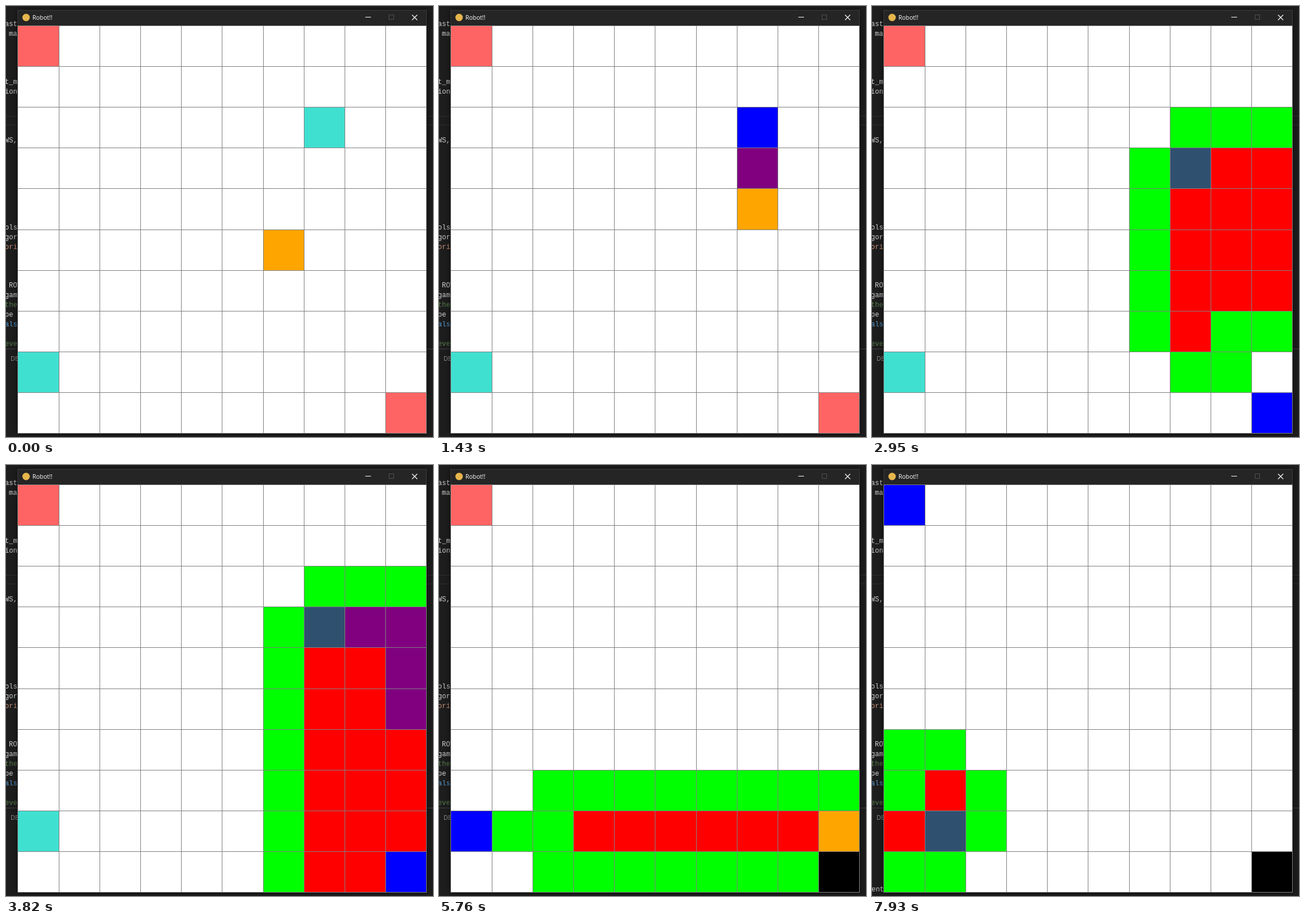
An HTML page with a canvas for the animation above (8000 ms loop, 744 px wide and 752 px high).

```html
<!DOCTYPE html>
<html lang="en">
<head>
<meta charset="utf-8">
<title>Robot grid</title>
<style>
  html, body { margin: 0; width: 100%; height: 100%; overflow: hidden; background: #1e1e1e; }
  canvas { display: block; }
</style>
</head>
<body>
<canvas id="stage" width="744" height="752"></canvas>
<script>
const ctx = document.getElementById('stage').getContext('2d');
const LOOP = 8000, SIZE = 10;
const WHITE = '#fff', OPEN = '#0f0', CLOSED = '#f00', PATH = '#800080', GOAL = '#00f',
      EMPTY_ROBOT = '#ffa500', LOADED_ROBOT = '#305070', DONE = '#000',
      PICKUP = '#40e0d0', DROP = '#ff6464', LINE = '#808080';

// Cell index = row * SIZE + column
const cells = Array(SIZE * SIZE).fill(WHITE);
const snapshots = [];
const snap = () => snapshots.push([...cells]);

function neighbours(cell) {
  const x = cell % SIZE, y = Math.floor(cell / SIZE);
  return [[x + 1, y], [x - 1, y], [x, y + 1], [x, y - 1]]
    .filter(([a, b]) => a >= 0 && a < SIZE && b >= 0 && b < SIZE)
    .map(([a, b]) => b * SIZE + a)
    .filter(n => cells[n] !== DONE);
}

const distance = (a, b) =>
  Math.abs(a % SIZE - b % SIZE) + Math.abs(Math.floor(a / SIZE) - Math.floor(b / SIZE));

// A* search; ties go to the cell that was queued first
function findPath(start, goal) {
  const cost = { [start]: 0 }, cameFrom = {};
  const queue = [{ cell: start, score: 0 }];
  while (queue[0].cell !== goal) {
    const { cell } = queue.shift();
    for (const next of neighbours(cell)) {
      if (cost[next] <= cost[cell] + 1) continue;
      cost[next] = cost[cell] + 1;
      cameFrom[next] = cell;
      queue.push({ cell: next, score: cost[next] + distance(next, goal) });
      if (next !== goal) cells[next] = OPEN;
    }
    queue.sort((a, b) => a.score - b.score);
    if (queue[0].cell !== goal) snap();
    if (cell !== start) cells[cell] = CLOSED;
  }
  const path = [];
  for (let c = cameFrom[goal]; c !== start; c = cameFrom[c]) path.unshift(c);
  return path;
}

function travel(start, goal, loaded) {
  const robot = loaded ? LOADED_ROBOT : EMPTY_ROBOT;
  cells[start] = robot;
  cells[goal] = GOAL;
  const path = findPath(start, goal);
  for (const c of path) { cells[c] = PATH; snap(); }
  cells.forEach((color, i) => { if (color === OPEN || color === CLOSED) cells[i] = WHITE; });
  if (loaded) snap();
  let position = start;
  for (const c of path) {
    cells[position] = WHITE;
    cells[c] = robot;
    position = c;
    snap();
  }
  cells[goal] = loaded ? DONE : WHITE;
  return position;
}

cells[0] = cells[99] = DROP;
cells[27] = cells[80] = PICKUP;
cells[56] = EMPTY_ROBOT;
snap();
[27, 99, 80, 0].reduce((position, goal, i) => travel(position, goal, i % 2 === 1), 56);

// Evenly paced runs of steps: first time, last time, count
const times = [
  [0, 0, 1], [340, 610, 4], [760, 1120, 5], [1340, 1520, 3], [1655, 2130, 6],
  [2220, 2320, 2], [2460, 3220, 9], [3310, 3400, 2], [3550, 3820, 4], [3950, 4040, 2],
  [4090, 4090, 1], [4250, 4830, 7], [4960, 4960, 1], [5080, 5740, 8], [5870, 5870, 1],
  [5960, 6610, 7], [6800, 7070, 4], [7220, 7490, 4], [7660, 7930, 4]
].flatMap(([from, to, n]) =>
  Array.from({ length: n }, (_, i) => Math.round(from + (to - from) * i / Math.max(1, n - 1))));
const OUTPUT_TIME = 7570;

const GREY = '#d4d4d4', COMMENT = '#587f4c';
const editorText = [
  ['ast', -2, 31, GREY], ['ma', 5, 48, GREY], ['t_m', -2, 132, GREY], ['ion', -2, 149, GREY],
  ['WS,', -2, 234, GREY], ['ols', -2, 386, GREY], ['gor', -2, 403, GREY], ['ori', -2, 420, '#ce9178'],
  ['ROW', 5, 487, GREY], ['gam', -2, 504, GREY], ['the', -2, 521, COMMENT], ['pe', -2, 538, GREY],
  ['als', -2, 555, '#569cd6'], ['eve', -2, 589, COMMENT]
];

function rect(x, y, w, h, color) {
  ctx.fillStyle = color;
  ctx.fillRect(x, y, w, h);
}

function label(text, x, y, color, font) {
  ctx.font = font;
  ctx.fillStyle = color;
  ctx.fillText(text, x, y);
}

function stroke(color, width, ...points) {
  ctx.strokeStyle = color;
  ctx.lineWidth = width;
  ctx.beginPath();
  points.forEach(([x, y], i) => i % 2 ? ctx.lineTo(x, y) : ctx.moveTo(x, y));
  ctx.stroke();
}

function drawEditor(t) {
  const mono = '12px "Liberation Mono", monospace';
  rect(0, 0, 744, 752, '#1e1e1e');
  for (const y of [192, 207]) rect(0, y, 744, 1, '#303030');
  rect(0, 598, 744, 1, '#444');
  ctx.textBaseline = 'alphabetic';
  for (const [text, x, y, color] of editorText) label(text, x, y + 4, color, mono);
  label('DE', 8, 619, '#999', '10.5px "Open Sans", sans-serif');
  if (t >= OUTPUT_TIME) label('ment', -8, 744, '#ccc', mono);
}

function drawWindow() {
  ctx.save();
  ctx.shadowColor = 'rgba(0,0,0,.5)';
  ctx.shadowBlur = 14;
  rect(20, 7, 713, 739, '#3c3c3c');
  ctx.restore();
  rect(21, 8, 711, 26, '#252525');
  ctx.fillStyle = '#e6b64c';
  ctx.beginPath();
  ctx.arc(35, 20, 6.5, 0, 7);
  ctx.fill();
  label('Robot!!', 46, 24, '#fff', '10.5px "Open Sans", sans-serif');
  rect(626, 19, 10, 1, '#fff');
  ctx.strokeStyle = '#505050';
  ctx.lineWidth = 1;
  ctx.strokeRect(667.5, 15.5, 8, 8);
  stroke('#fff', 1.2, [707.5, 15.5], [716.5, 24.5], [716.5, 15.5], [707.5, 24.5]);
}

const lineX = i => Math.floor(20.99 + 71.17 * i);
const lineY = i => Math.floor(34.4 + 71.13 * i);

function drawGrid(colors) {
  colors.forEach((color, i) => {
    const col = i % SIZE, row = Math.floor(i / SIZE);
    rect(lineX(col), lineY(row), lineX(col + 1) - lineX(col), lineY(row + 1) - lineY(row), color);
  });
  for (let i = 0; i <= SIZE; i++) {
    rect(lineX(i), 34, 1, 712, LINE);
    rect(20, lineY(i), 713, 1, LINE);
  }
}

const begin = performance.now();
function frame() {
  const t = (performance.now() - begin) % LOOP;
  drawEditor(t);
  drawWindow();
  drawGrid(snapshots[times.filter(time => time <= t).length - 1]);
  requestAnimationFrame(frame);
}
frame();
</script>
</body>
</html>
```
